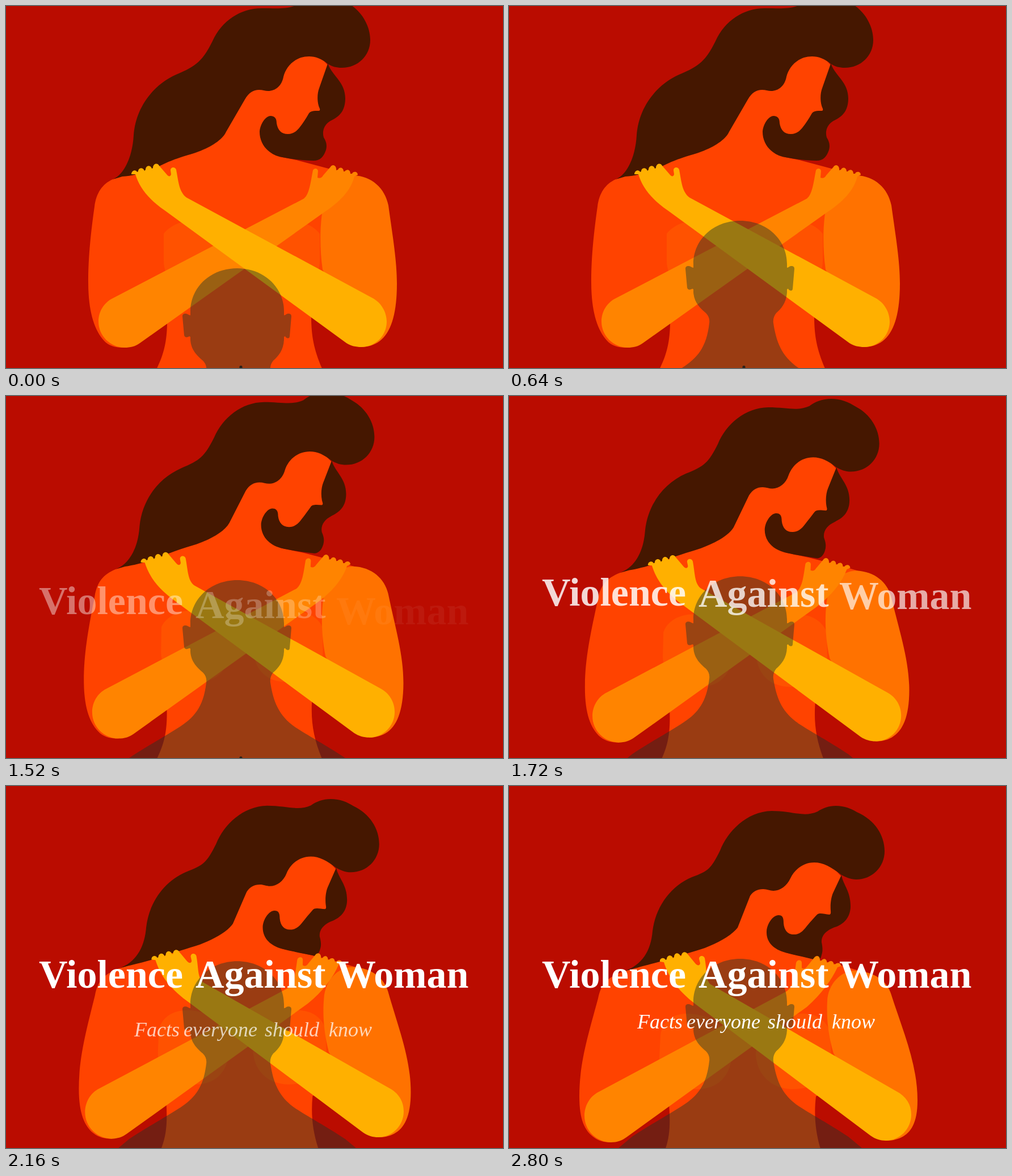
These frames come from a looping animation (876 by 639 pixels, 7040 ms). An HTML page:

```html
<!DOCTYPE html>
<html lang="en">
<head>
<meta charset="utf-8">
<title>Violence Against Woman</title>
<style>
  html, body { margin: 0; width: 100%; height: 100%; overflow: hidden; background: #ba0c00; }
  svg { display: block; width: 100%; height: 100%; }
  text { fill: #fff; font-family: "Liberation Serif", "Noto Serif", serif; }
  .title { font-size: 70px; font-weight: bold; }
  .subtitle { font-size: 36px; font-style: italic; }
</style>
</head>
<body>
<svg viewBox="0 0 876 639">
  <rect width="876" height="639" fill="#ba0c00"/>
  <g id="woman"></g>
  <path id="man" fill="#203428" opacity=".45" d="M407.5,379 C360,379 325,413 325,455 V462
    C322,462 320,459 317,459 C312,459 311,461 311,464 L314,497 C315,502 320,501 323,499 L325,500 V505
    C326,524 338,534 347,542 C352,547 354,553 353,560 C348,603 332,622 303,640
    C275,658 255,668 217,693 L193,713 L150,741 V800 H665 V741 L622,713 L598,693
    C560,668 540,658 512,640 C480,619 471,592 466,560 C465,553 467,547 471,542
    C480,534 489,524 490,505 V500 L492,499 C494,503 500,504 500,499 L503,464
    C503,461 502,459 497,459 C494,459 493,462 490,462 V455 C490,413 455,379 407.5,379 Z"/>
  <g class="title">
    <text class="word" x="58" y="356">Violence</text>
    <text class="word" x="334" y="356">Against</text>
    <text class="word" x="582" y="356">Woman</text>
  </g>
  <text id="subtitle" class="subtitle" y="428"><tspan x="226">Facts</tspan> <tspan x="313">everyone</tspan> <tspan x="456">should</tspan> <tspan x="569">know</tspan></text>
</svg>
<script>
const LOOP = 7040, STEP = 40, DROP = 26;
const SKIN = '#ff4300', BREAST = '#ff5200', HAIR = '#451700';

// Each part, back to front: colour, upright pose, bowed pose.
const parts = [
  { fill: SKIN, // body, neck and face
    from: `M188,306 C170,314 159,330 156,354 C148,410 145,450 145,488 C145,540 156,575 176,594
      C186,602 196,603 209,603 L284,548 C285,600 275,625 255,660 L566,660 C545,615 538,590 538,548
      L612,500 L612,299 L572,288 L512,272 L482,266 L512,250 L562,192 L562,150 L567,104 L534,70
      L420,140 L370,235 L268,280 Z`,
    to: `M203,327 C172,338 162,350 157,375 C138,445 124,490 124,548 C124,590 134,608 148,619
      C158,627 168,629 180,629 L282,560 C286,620 281,635 255,686 L566,686 C546,640 535,600 541,548
      L612,500 L640,333 L583,316 L545,307 L487,294 L520,272 L575,234 L580,190 L586,160 L540,110
      L425,175 L390,262 L285,302 Z` },
  { fill: BREAST,
    from: `M278,402 C290,385 320,375 345,378 C380,382 395,410 395,440 C395,480 375,500 340,500
      C300,500 278,480 278,450 Z`,
    to: `M267,440 C270,415 290,400 320,402 C370,405 395,440 393,475 C390,515 365,535 333,535
      C295,535 265,515 265,478 Z` },
  { fill: BREAST,
    from: `M553,402 C541,385 511,375 486,378 C451,382 436,410 436,440 C436,480 456,500 491,500
      C531,500 553,480 553,450 Z`,
    to: `M566,440 C563,415 543,400 513,402 C463,405 435,440 435,475 C438,515 468,535 500,535
      C538,535 568,515 568,478 Z` },
  { fill: '#ff7200', // right upper arm
    from: `M612,299 C645,300 668,322 674,352 C682,410 689,450 689,490 C689,545 678,580 655,594
      C645,600 635,602 626,602 L558,465 C553,430 553,390 558,360 C565,320 585,302 612,299 Z`,
    to: `M612,326 C645,328 666,345 673,366 C694,432 720,490 720,555 C720,595 708,612 692,620
      C682,625 673,626 664,626 L572,472 C560,430 560,400 561,380 C562,350 585,325 612,326 Z` },
  { fill: HAIR,
    from: `M188,306 C208,298 223,266 225,228 C229,176 262,138 300,121 C336,106 347,96 364,62
      C380,26 414,4 450,4 C480,4 494,6 513,-2 C524,-12 540,-18 558,-18 C578,-18 594,-11 609,-1
      C628,12 642,36 642,60 C642,88 620,109 592,109 C582,109 575,107 567,102
      C556,93 546,89 534,89 C511,89 494,105 489,125 C486,141 475,150 462,150
      C457,150 452,148 446,148 C436,148 428,153 421,165 L388,222 C380,240 350,254 331,260
      C300,269 285,275 268,284 C250,292 225,300 205,301 Z`,
    to: `M203,327 C234,316 250,292 253,256 C259,212 285,177 322,161 C352,150 356,146 372,114
      C385,81 418,45 463,44 C500,44 520,56 544,45 C553,39 564,35 576,35 C592,35 603,40 613,46
      C645,60 662,87 662,115 C662,143 640,165 612,165 C602,165 594,161 586,157
      C568,143 554,135 538,135 C518,135 503,148 496,163 C490,176 478,185 466,185
      C460,185 455,182 448,182 C438,182 430,186 425,194 L403,250 C392,264 370,276 345,286
      C325,293 300,299 280,306 C260,312 235,318 218,323 Z` },
  { fill: HAIR, // front lock
    from: `M568,103 C574,122 598,134 598,163 C598,192 580,198 570,204 C560,211 557,222 560,232
      C565,240 566,246 564,254 C560,266 554,273 542,273 C525,273 500,270 482,266
      C460,260 447,242 447,222 C448,208 458,194 466,194 C474,194 477,199 477,207
      C479,219 485,226 497,226 C506,226 512,221 517,215 C524,206 529,198 533,191
      C536,185 542,185 552,185 C555,183 552,180 551,176 C548,165 549,153 552,145 L567,102 Z`,
    to: `M586,158 C590,176 602,186 602,212 C602,232 590,243 578,248 C562,253 550,262 551,276
      C553,286 553,292 551,298 C550,303 548,306 545,308 C525,303 505,299 487,294
      C466,288 454,276 454,258 C454,244 465,228 475,228 C482,228 484,232 484,242
      C485,256 493,263 503,262 C511,262 517,257 522,251 C530,241 538,232 543,227
      C547,223 555,226 565,227 C568,226 567,222 567,220 C566,208 568,196 571,189 L586,157 Z` },
  { fill: '#ff8400', // rear forearm and hand
    from: `M525,340 C535,332 537,310 541,290 C543,286 549,286 550,291 L549,303
      C553,305 557,303 559,299 L572,284 C576,278 583,282 582,290 L585,289 C588,283 595,285 595,292
      L597,292 C601,287 607,289 607,296 L610,296 C612,291 620,292 620,298 L614,301
      C608,325 590,345 558,366 L236,595 C228,601 219,603 209,603 C184,603 163,582 163,557
      C163,540 172,524 188,516 Z`,
    to: `M490,362 C502,352 503,335 506,312 C508,306 516,306 516,312 L516,321
      C519,324 523,322 525,319 L538,303 C543,297 549,301 548,309 L551,308 C554,303 561,305 560,312
      L563,311 C566,307 573,309 572,315 L575,315 C578,311 585,312 585,318 L579,320
      C568,343 551,367 525,390 L207,620 C199,626 190,629 180,629 C154,629 133,608 133,582
      C133,565 142,548 158,540 Z` },
  { fill: '#ffb000', // front forearm and hand
    from: `M318,338 C305,328 304,310 300,289 C298,283 290,284 290,290 L291,297
      C290,302 286,301 283,297 L270,282 C267,276 259,278 259,286 L257,287 C255,280 246,281 246,289
      L244,291 C242,284 233,285 233,292 L231,293 C229,288 221,290 221,297 L228,297
      C235,320 250,340 280,361 L600,595 C608,600 617,602 626,602 C651,602 671,582 671,557
      C671,540 661,523 645,515 Z`,
    to: `M355,350 C346,342 349,325 345,304 C343,298 335,299 335,305 L337,313
      C336,318 332,317 329,314 L315,297 C312,291 304,292 304,300 L302,300 C299,293 291,294 291,302
      L289,304 C287,297 278,298 278,306 L276,307 C273,301 265,304 266,310 L273,311
      C280,333 293,358 330,386 L637,617 C645,623 655,626 664,626 C689,626 709,605 709,580
      C709,562 700,548 683,539 Z` },
  { fill: '#35130a', // navel
    from: 'M411.5,637 C411.5,634 416.5,634 416.5,637 L416.5,645 L411.5,645 Z',
    to: 'M411.5,663 C411.5,660 416.5,660 416.5,663 L416.5,671 L411.5,671 Z' },
];

// Smooth monotone curve through [time, value] keys.
function track(keys) {
  const slope = i => (keys[i + 1][1] - keys[i][1]) / (keys[i + 1][0] - keys[i][0]);
  const last = keys.length - 1;
  const tangents = keys.map((_, i) => {
    if (i === 0) return slope(0);
    if (i === last) return 0;
    const a = slope(i - 1), b = slope(i);
    return a * b > 0 ? 2 * a * b / (a + b) : 0;
  });
  return t => {
    if (t <= keys[0][0]) return keys[0][1];
    if (t >= keys[last][0]) return keys[last][1];
    const i = keys.findIndex(key => key[0] > t) - 1;
    const [t0, v0] = keys[i], [t1, v1] = keys[i + 1];
    const span = t1 - t0, u = (t - t0) / span, w = 1 - u;
    return v0 * w * w * (1 + 2 * u) + v1 * u * u * (3 - 2 * u)
      + span * u * w * (tangents[i] * w - tangents[i + 1] * u);
  };
}

const bow = track([[0, 0], [680, 0], [1200, .08], [1520, .37], [1880, .64], [2480, .92], [2800, 1]]);
const sink = track([[1440, 0], [1520, 1.5], [1880, 14], [2480, 24], [2800, DROP]]);
const manRise = track([[0, 84], [300, 41], [640, 0], [1200, -41], [1520, -54], [1880, -65], [2480, -73], [2800, -74]]);
const wordRise = track([[0, 50], [30, 45], [80, 36], [120, 29], [380, 10], [480, 5], [700, 0]]);
const wordFade = track([[0, 0], [30, .08], [80, .26], [120, .42], [380, .9], [480, .95], [700, 1]]);
const subRise = track([[1780, 50], [1880, 36], [2160, 14], [2480, 4], [2800, 0]]);
const subFade = track([[1780, 0], [1880, .25], [2160, .72], [2480, .95], [2800, 1]]);
const wordStarts = [1400, 1440, 1500];

const woman = document.getElementById('woman');
const man = document.getElementById('man');
const words = document.querySelectorAll('.word');
const subtitle = document.getElementById('subtitle');
const NUMBER = /-?\d+(\.\d+)?/g;

for (const part of parts) {
  part.node = document.createElementNS(woman.namespaceURI, 'path');
  part.node.setAttribute('fill', part.fill);
  part.end = part.to.match(NUMBER).map(Number);
  woman.append(part.node);
}

const moveY = (node, y) => node.setAttribute('transform', `translate(0 ${y.toFixed(2)})`);

function reveal(node, y, opacity) {
  moveY(node, y);
  node.setAttribute('opacity', opacity);
}

function draw(t) {
  const p = bow(t);
  for (const { node, from, end } of parts) {
    let i = 0;
    node.setAttribute('d', from.replace(NUMBER, n => (+n + (end[i++] - n) * p).toFixed(2)));
  }
  moveY(woman, sink(t) - DROP * p);
  moveY(man, manRise(t));
  words.forEach((word, i) => reveal(word, wordRise(t - wordStarts[i]), wordFade(t - wordStarts[i])));
  reveal(subtitle, subRise(t), subFade(t));
}

function tick() {
  const t = performance.now() % LOOP;
  draw(Math.floor(t / STEP) * STEP);
  requestAnimationFrame(tick);
}
tick();
</script>
</body>
</html>
```
